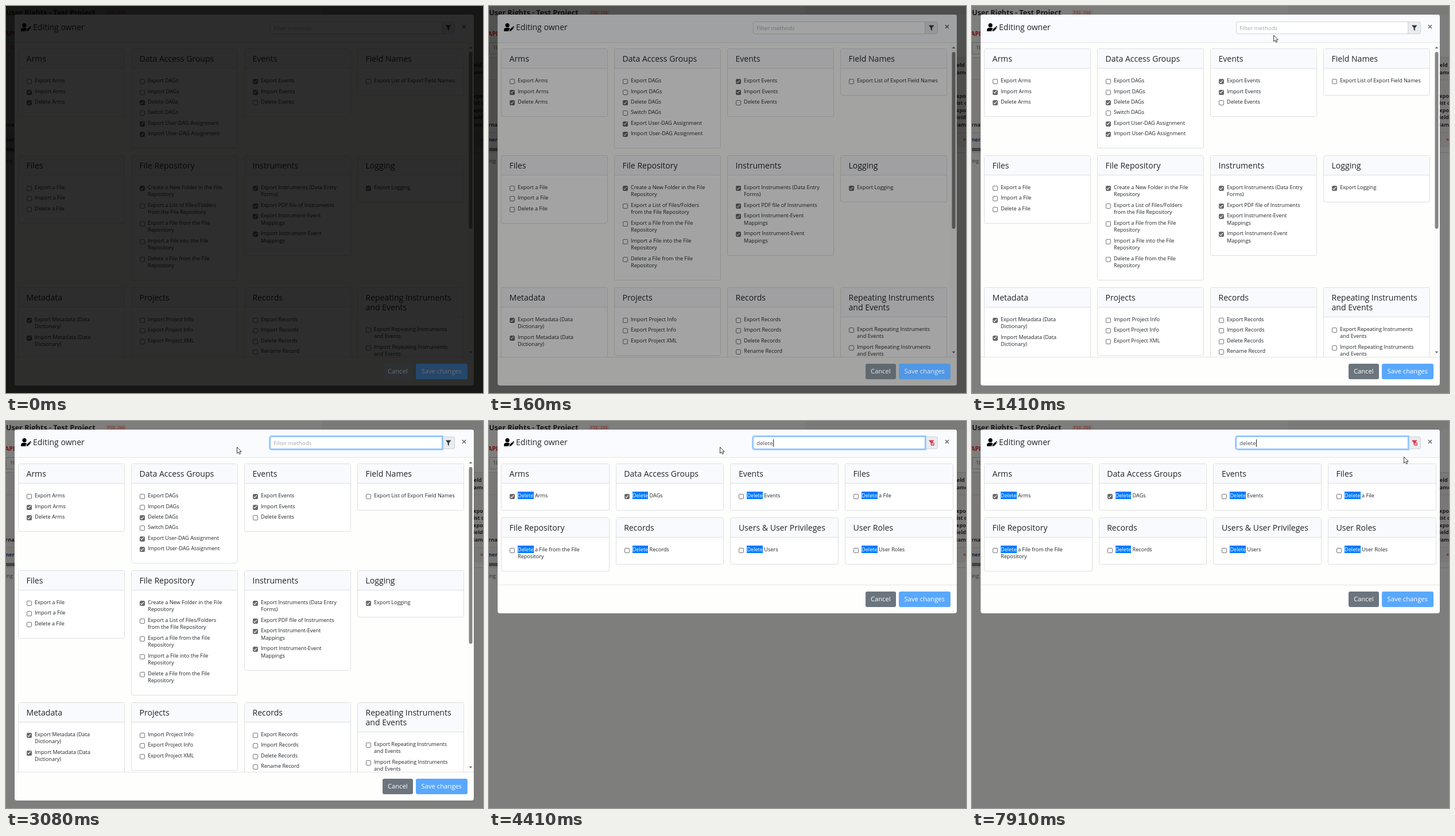
An HTML page for the animation above (8000 ms loop, 831x674 px).

```html
<!DOCTYPE html>
<html lang="en">
<head>
<meta charset="utf-8">
<title>Method filter</title>
<style>
html, body { margin: 0; width: 100%; height: 100%; overflow: hidden; }
body { position: relative; background: #7e7e7c; font: 9.13px/12.5px "Open Sans", sans-serif; color: #212529; }
#page, #dim { position: absolute; inset: 0; overflow: hidden; }
#page > * { position: absolute; white-space: nowrap; }
#page b { color: #161616; }
#modal { position: absolute; left: 15px; top: 15px; width: 800px; max-height: 646px; display: flex;
  flex-direction: column; background: #fefefd; border-radius: 4px; overflow: hidden; box-shadow: 0 0 1px #555; }
header { flex: none; position: relative; height: 47.5px; background: #fafbfe; border-bottom: 1px solid #e4e6e9; }
header > * { position: absolute; box-sizing: border-box; }
h1 { left: 32px; top: 13px; margin: 0; font-size: 14.05px; line-height: 18px; font-weight: 400; }
#field { left: 445px; top: 12px; width: 300px; height: 22px; border: 1px solid #ced4da; background: #fff;
  padding-left: 5px; font-size: 9.83px; line-height: 20px; color: #495057; border-radius: 3px 0 0 3px; white-space: nowrap; }
#field.focus { border-color: #80bdff; box-shadow: 0 0 0 2px #9fcdff; z-index: 1; }
#field.empty #query { color: #a3a8ad; }
#caret { position: absolute; top: 3.5px; width: 1px; height: 13px; background: #222; }
#funnel { left: 744px; top: 12px; width: 23px; height: 22px; background: #e9ecef; border: 1px solid #ced4da;
  border-radius: 0 3px 3px 0; color: #343a40; }
#funnel.active { color: #dc3545; }
#funnel:not(.active) .clear { display: none; }
main { position: relative; flex: 1 1 auto; min-height: 0; overflow: hidden; padding: 10.7px 0 23px 6px; }
#grid { display: grid; grid-template-columns: repeat(4, 188.7px); gap: 11.8px 11px; align-items: start; }
.full #grid { grid-template-columns: repeat(4, 186px); }
.card { box-sizing: border-box; border: 1px solid #dedfe1; border-radius: 3px; background: #fff; padding-bottom: 18.5px; }
.card h2 { margin: 0 0 15px; padding: 8px 13.5px; border-bottom: 1px solid #dedfe1; background: #f9fafd;
  font-size: 14.05px; line-height: 17px; font-weight: 400; white-space: pre; }
.item { position: relative; margin: 0 0 5.9px 28px; white-space: pre; }
.item:last-child { margin-bottom: 0; }
.item i { position: absolute; left: -14px; top: 3px; box-sizing: border-box; width: 9px; height: 9px;
  border: 1px solid #767676; border-radius: 2px; background: #fff; }
.item i.on { background: #6a6a6a; border-color: #6a6a6a; }
.item i.on::after { content: ""; position: absolute; left: 2px; top: -.3px; width: 2px; height: 4.5px;
  border: solid #fff; border-width: 0 1.3px 1.3px 0; transform: rotate(42deg); }
mark { background: #007bff; color: #fff; }
#bar { display: none; position: absolute; left: 788px; top: 0; width: 12px; height: 100%; background: #fcfcfc; }
.full #bar { display: block; }
footer { flex: none; position: relative; height: 49px; border-top: 1px solid #e2e4e7; }
footer span { position: absolute; z-index: 2; top: 11px; height: 26.7px; border-radius: 3px; color: #fff;
  text-align: center; font-size: 11.24px; line-height: 26.7px; }
#dim { background: #000; z-index: 1; }
#pointer { position: absolute; left: 0; top: 0; z-index: 3; overflow: visible; }
</style>
</head>
<body>
<div id="page"></div>
<div id="modal" class="full">
  <header>
    <svg style="left:11px;top:15px" width="18" height="15" viewBox="0 0 18 15">
      <circle cx="6" cy="3.6" r="3.6"/>
      <path d="M0 14v-2q0-4 4-4h4.5l2 1.5-2 2.3-.4 2.2z"/>
      <path d="M9.5 14l.5-2.8 4.7-4.7 2.3 2.3-4.7 4.7zM15.3 6l1-1q1.6.4 1.6 2l-.5 1z"/>
    </svg>
    <h1>Editing owner</h1>
    <div id="field"><span id="query"></span><span id="caret"></span></div>
    <div id="funnel">
      <svg width="21" height="20" viewBox="0 0 21 20">
        <path fill="currentColor" d="M6 5.5h9.5l-3.7 4.8v5l-2.2-1.7v-3.3z"/>
        <g class="clear"><circle cx="13" cy="12" r="2.5" fill="#e9ecef" stroke="currentColor" stroke-width="1.2"/>
        <path d="M11.3 10.3l3.4 3.4" stroke="currentColor"/></g>
      </svg>
    </div>
    <svg style="left:779px;top:16.5px" width="8" height="8"><path d="M1 1l6 6M7 1l-6 6" stroke="#666" stroke-width="1.5"/></svg>
  </header>
  <main>
    <div id="grid"></div>
    <svg id="bar" width="12" height="548">
      <path d="M3.5 10l3-3.5 3 3.5zM3.5 537.5l3 3.5 3-3.5z" fill="#777"/>
      <rect x="3.5" y="16" width="6" height="308" rx="3" fill="#858585"/>
    </svg>
  </main>
  <footer>
    <span style="left:641px;width:52.5px;background:#6c757d">Cancel</span>
    <span style="left:699px;width:89.5px;background:#59a8fd">Save changes</span>
  </footer>
</div>
<div id="dim"></div>
<svg id="pointer" width="12" height="16">
  <path id="arrow" d="M.5.5v10.8l2.5-2.2 1.7 3.7 1.9-.9-1.7-3.5h3.3z" fill="#fff" stroke="#222" stroke-width=".9"/>
  <path id="beam" d="M-2-6h1.5l.5.5.5-.5H2M0-5.5v11M-2 6h1.5l.5-.5.5.5H2" fill="none" stroke="#222" stroke-width=".9"/>
</svg>
<script>
const $ = id => document.getElementById(id);

// "+" marks a ticked method, "|" a line break.
const groups = {
  "Arms": ["Export Arms", "+Import Arms", "+Delete Arms"],
  "Data Access Groups": ["Export DAGs", "Import DAGs", "+Delete DAGs", "Switch DAGs",
    "+Export User-DAG Assignment", "+Import User-DAG Assignment"],
  "Events": ["+Export Events", "+Import Events", "Delete Events"],
  "Field Names": ["Export List of Export Field Names"],
  "Files": ["Export a File", "Import a File", "Delete a File"],
  "File Repository": ["+Create a New Folder in the File|Repository",
    "Export a List of Files/Folders|from the File Repository", "Export a File from the File|Repository",
    "Import a File into the File|Repository", "Delete a File from the File|Repository"],
  "Instruments": ["+Export Instruments (Data Entry|Forms)", "+Export PDF file of Instruments",
    "+Export Instrument-Event|Mappings", "+Import Instrument-Event|Mappings"],
  "Logging": ["+Export Logging"],
  "Metadata": ["+Export Metadata (Data|Dictionary)", "+Import Metadata (Data|Dictionary)"],
  "Projects": ["Import Project Info", "Export Project Info", "Export Project XML"],
  "Records": ["Export Records", "Import Records", "Delete Records", "Rename Record"],
  "Repeating Instruments|and Events": ["Export Repeating Instruments|and Events", "Import Repeating Instruments|and Events"],
  "Users &amp; User Privileges": ["Export Users", "Import Users", "Delete Users"],
  "User Roles": ["Export User Roles", "Import User Roles", "Delete User Roles"]
};

const breakLines = text => text.replace(/\|/g, "\n");

function itemHtml(method, query) {
  let label = breakLines(method.replace("+", ""));
  if (query) label = label.replace(new RegExp(query, "gi"), "<mark>$&</mark>");
  return `<div class="item"><i class="${method[0] === "+" ? "on" : ""}"></i>${label}</div>`;
}

function showResults(query) {
  $("grid").innerHTML = Object.entries(groups).map(([title, methods]) => {
    const found = methods.filter(m => m.toLowerCase().includes(query));
    return found.length ? `<div class="card"><h2>${breakLines(title)}</h2>${found.map(m => itemHtml(m, query)).join("")}</div>` : "";
  }).join("");
  $("modal").classList.toggle("full", !query);
  $("funnel").classList.toggle("active", !!query);
  $("field").classList.toggle("empty", !query);
  $("query").textContent = query || "Filter methods";
  $("caret").style.left = query ? 5 + $("query").getBoundingClientRect().width + "px" : "5px";
}

function addPage() {
  const box = (x, y, w, h, color) => `<div style="left:${x}px;top:${y}px;width:${w}px;height:${h}px;background:${color}"></div>`;
  const text = (x, y, label, style = "") => `<b style="left:${x}px;top:${y - 6.25}px;${style}">${label}</b>`;
  const plain = "font-weight:400;color:#2b2b2b;";
  $("page").innerHTML =
    box(550, 0, 281, 15, "#7a7a78") + box(0, 89, 831, 131, "#797876") + box(0, 220, 831, 26, "#777775") +
    [89, 128, 220, 255].map(y => box(0, y, 831, 1, "#6b6b69")).join("") +
    box(0, 247, 15, 6, "#434343") + box(0, 63, 15, 21, "#626262") + box(1, 64, 14, 19, "#7e7e7c") +
    box(174, 7, 36, 10, "#7d7472") +
    text(0, 11, "User Rights - Test Project", "font-size:12.64px") +
    text(177, 12.5, "PID 298", "font:7.1px/12.5px 'Liberation Mono',monospace;color:#8a2a2a") +
    text(-2, 48, "API", "font-size:10.5px;color:#701010") + text(7, 73, "10", plain) +
    text(-1, 207, "rnal") + text(-1, 233, "ner", "color:#141b3c") + text(-1, 270, "ing", plain) +
    ["Field", "Name"].map((s, i) => text(807, 103.5 + i * 12.5, s)).join("") +
    ["Export", "List of", "Export", "Field", "Names"].map((s, i) => text(809, 157 + i * 12.5, s)).join("") +
    text(826, 233, "×", "color:#8a1515");
}

const LOOP = 8000, STEP = 1000 / 12;
const fade = [.82, .58, .36, .2, .08, 0];
const buttonLight = [.42, .7, .9, .95, 1, 1];
const typing = [[3500, "d"], [3750, "de"], [3910, "del"], [4080, "dele"], [4330, "delet"], [4400, "delete"]];
const path = [[910, 754, 289], [1160, 640, 150], [1410, 525, 51], [1580, 528, 38], [2250, 500, 38], [2500, 462, 46],
  [2830, 402, 45], [5200, 402, 45], [6000, 395, 17], [6830, 560, 72], [7660, 712, 73], [7910, 752, 62]];
const FOCUS = 1830;

function pointerAt(t) {
  const next = path.findIndex(p => p[0] > t);
  if (next < 1) return path[next < 0 ? path.length - 1 : 0].slice(1);
  const [t0, x0, y0] = path[next - 1], [t1, x1, y1] = path[next];
  const k = (t - t0) / (t1 - t0);
  return [x0 + (x1 - x0) * k, y0 + (y1 - y0) * k];
}

function caretOn(t) {
  const blink = start => Math.floor((t - start) / 250) % 2 === 0;
  if (t < FOCUS) return false;
  if (t < 3500) return blink(FOCUS);
  return t < 4500 || t >= 7500 || blink(4500);
}

let shownQuery = null;
function render(now) {
  const time = now % LOOP;
  const step = Math.floor((time + 9) / STEP);
  const t = step * STEP;

  const query = typing.reduce((last, [at, text]) => t >= at ? text : last, "");
  if (query !== shownQuery) showResults(shownQuery = query);

  const shade = Math.min(step, fade.length - 1);
  $("dim").style.opacity = fade[shade];
  document.querySelectorAll("footer span").forEach(b => b.style.filter = `brightness(${buttonLight[shade]})`);

  $("field").classList.toggle("focus", t >= FOCUS);
  $("caret").style.visibility = caretOn(t) ? "visible" : "hidden";

  const [x, y] = pointerAt(t);
  const overField = x > 460 && x < 759 && y > 27 && y < 48;
  $("pointer").style.visibility = t >= path[0][0] ? "visible" : "hidden";
  $("pointer").style.transform = `translate(${x}px, ${y}px)`;
  $("arrow").style.display = overField ? "none" : "";
  $("beam").style.display = overField ? "" : "none";
}

addPage();
let start;
function tick(now) {
  start ??= now;
  render(now - start);
  requestAnimationFrame(tick);
}
render(0);
requestAnimationFrame(tick);
</script>
</body>
</html>
```
